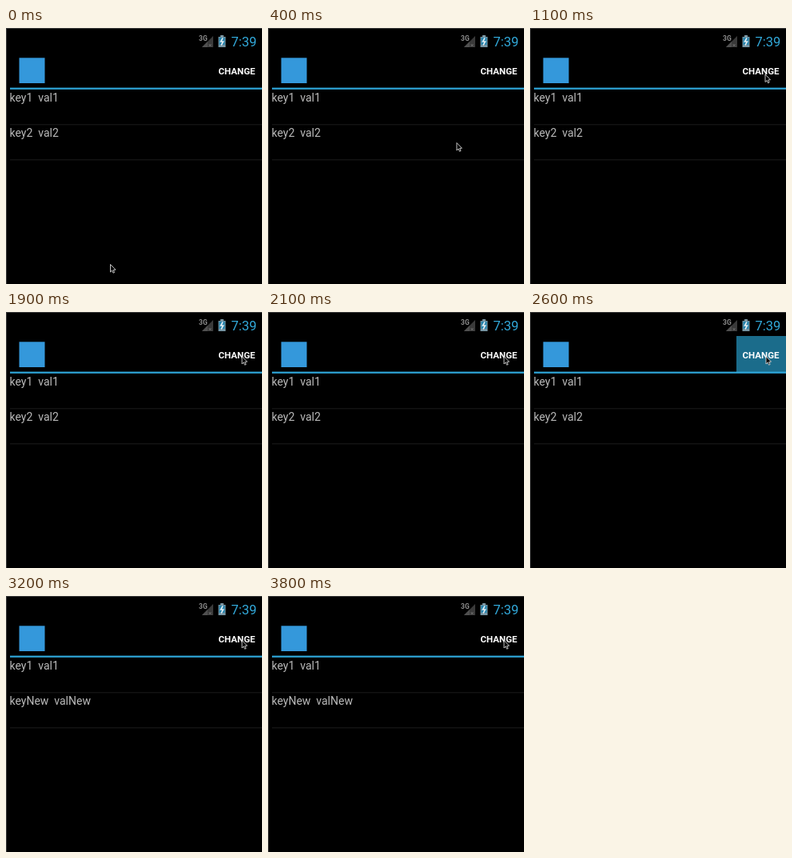
These frames come from a looping animation (320x320 px, 4000 ms). An HTML page with a canvas:

```html
<!DOCTYPE html>
<html lang="en">
<head>
<meta charset="utf-8">
<title>List change</title>
<style>
html, body { margin: 0; width: 100%; height: 100%; overflow: hidden; background: #000; }
canvas { display: block; width: 320px; height: 320px; }
</style>
</head>
<body>
<canvas id="stage" width="320" height="320"></canvas>
<script>
const ctx = document.getElementById('stage').getContext('2d');
const LOOP = 4000;
const CHANGE_AT = 2700;

const between = (t, from, to) => t >= from && t < to;

// Smooth 0 to 1 over the given time span
function ease(t, from, to) {
  const p = Math.min(1, Math.max(0, (t - from) / (to - from)));
  return p * p * (3 - 2 * p);
}

function rect(x, y, w, h, color) {
  ctx.fillStyle = color;
  ctx.fillRect(x, y, w, h);
}

function text(str, x, y, size, color, weight = 400) {
  ctx.font = `${weight} ${size}px Roboto, sans-serif`;
  ctx.fillStyle = color;
  ctx.fillText(str, x, y);
}

// Right-angled triangle with its corner at the lower right
function wedge(right, bottom, size, color) {
  ctx.beginPath();
  ctx.moveTo(right, bottom - size);
  ctx.lineTo(right, bottom);
  ctx.lineTo(right - size, bottom);
  ctx.fillStyle = color;
  ctx.fill();
}

function drawBattery(x, y) {
  rect(x + 2.5, y, 4, 2, '#7d97a3');
  rect(x, y + 2, 9, 13, '#7795a3');
  rect(x + 1, y + 3, 7, 9, '#2583ad');
  ctx.beginPath();
  ctx.moveTo(x + 5.5, y + 3.5);
  ctx.lineTo(x + 3, y + 8);
  ctx.lineTo(x + 6, y + 8);
  ctx.lineTo(x + 3.5, y + 12.5);
  ctx.lineWidth = 1.6;
  ctx.strokeStyle = '#e4eef2';
  ctx.stroke();
}

function drawStatusBar() {
  text('3G', 241, 16, 8.5, '#8c8c8c', 700);
  wedge(259, 24, 14, '#3a3a3a');
  wedge(252, 24, 7, '#505050');
  text('×', 253, 23.5, 8, '#777');
  drawBattery(265.5, 9);
  text('7:39', 281.5, 23.3, 16.5, '#32a9da');
}

function drawActionBar(pressed) {
  if (pressed) rect(258, 30, 62, 45, '#1b6c8b');
  rect(16.5, 37.3, 32, 31.7, '#3498db');
  text('CHANGE', 265.5, 57.6, 11.5, '#fff', 700);
  rect(5, 74.6, 315, 2.2, '#2fa6d9');
}

function drawList(changed) {
  const rows = ['key1\u00a0 val1', changed ? 'keyNew\u00a0 valNew' : 'key2\u00a0 val2'];
  rows.forEach((row, i) => {
    text(row, 4.5, 92 + i * 44, 14, '#bababa');
    rect(5, 120.3 + i * 44, 315, 1, '#1c1c1c');
  });
}

function drawPointer(t) {
  const travel = ease(t, 100, 600);
  const settle = ease(t, 700, 1400);
  ctx.save();
  ctx.translate(130 + 162 * travel + 2.5 * settle, 295 - 233.5 * travel - 6.5 * settle);
  ctx.beginPath();
  ctx.moveTo(0.5, 0.5);
  ctx.lineTo(0.5, 10);
  ctx.lineTo(2.6, 8);
  ctx.lineTo(4, 11.2);
  ctx.lineTo(5.6, 10.5);
  ctx.lineTo(4.2, 7.4);
  ctx.lineTo(7, 7.2);
  ctx.closePath();
  ctx.fillStyle = '#000';
  ctx.fill();
  ctx.strokeStyle = '#d8d8d8';
  ctx.lineWidth = 0.9;
  ctx.stroke();
  ctx.restore();
}

function draw(t) {
  rect(0, 0, 320, 320, '#000');
  rect(0, 0, 320, 1, '#3a3a3a');
  rect(0, 0, 1, 320, '#3a3a3a');
  drawStatusBar();
  drawActionBar(between(t, 2400, CHANGE_AT) || between(t, 3500, 3700));
  drawList(t >= CHANGE_AT);
  drawPointer(t);
}

const start = performance.now();
function tick() {
  draw((performance.now() - start) % LOOP);
  requestAnimationFrame(tick);
}
tick();
</script>
</body>
</html>
```
